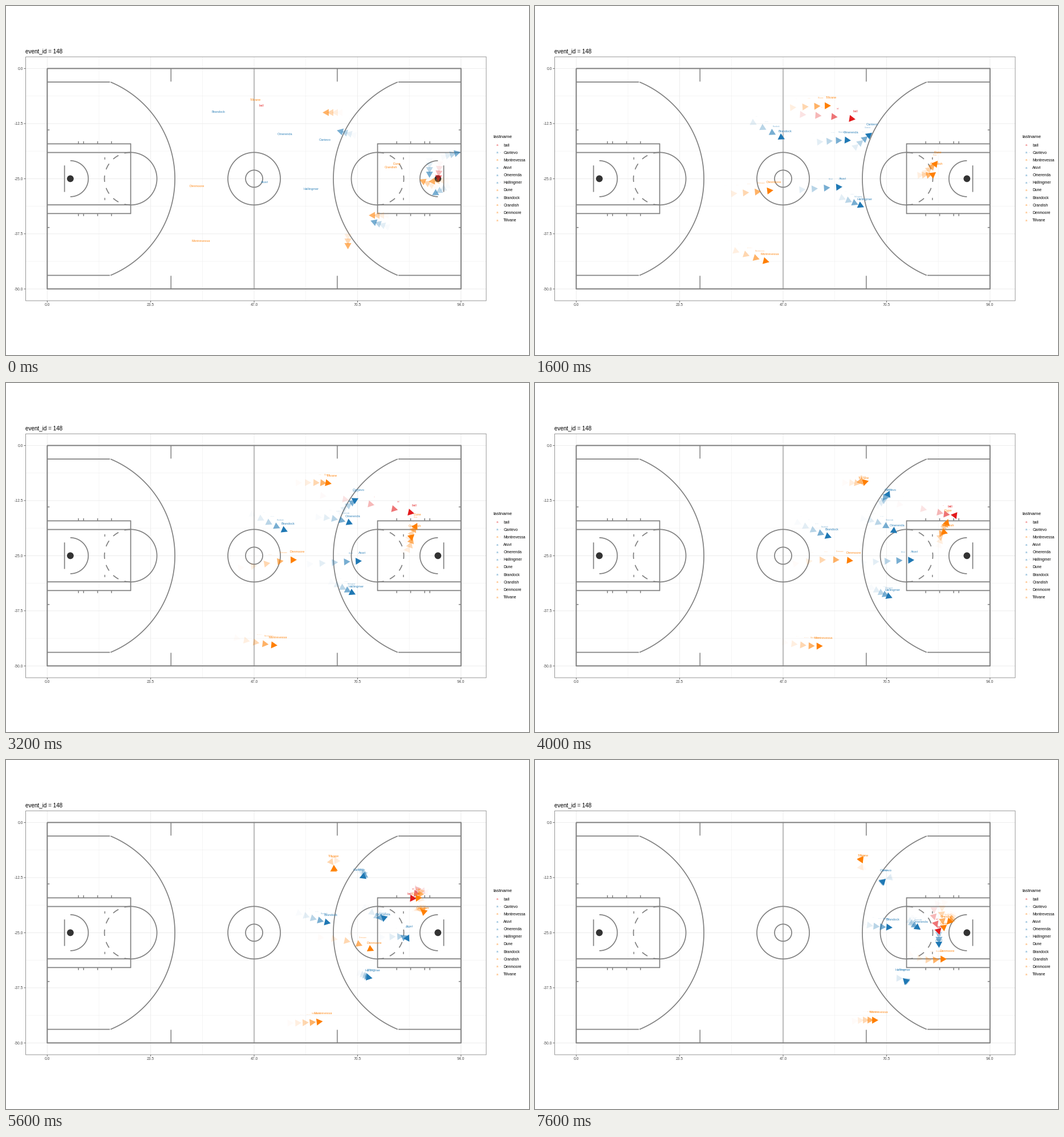
Recreate the animation shown at these times as a matplotlib script. Size 917 by 611 pixels, loop 8000 ms.

```python
import numpy as np
import matplotlib.pyplot as plt
from matplotlib.animation import FuncAnimation

W, H, DPI = 917, 611, 72          # at 72 dpi one point is one pixel
FRAMES, INTERVAL = 20, 400
BLUE, ORANGE, RED = "#1f78b4", "#ff7f00", "#e31a1c"
GREY = "#808080"
X0, Y0, FT = 71.8, 108.9, 7.718   # court origin and pixels per foot
X1, Y1 = X0 + 94 * FT, Y0 + 50 * FT
MID_X, MID_Y = (X0 + X1) / 2, (Y0 + Y1) / 2
LABEL_SIZE, LABEL_RISE = 5.6, 14.5
WAKE = 5                          # poses visible at once
KEYS = np.array([0, 4, 8, 12, 16, 19])

# Each runner passes through these points at the key frames.
RUNNERS = {
    "ball": (RED, (448, 188), (562, 198), (716, 228), (718, 233), (699, 269), (709, 306)),
    "Cantevo": (BLUE, (559, 248), (591, 221), (618, 201), (623, 204), (614, 208), (615, 207)),
    "Montrevessa": (ORANGE, (341, 425), (411, 448), (476, 459), (531, 459), (577, 455), (602, 455)),
    "Aruvi": (BLUE, (453, 322), (539, 316), (624, 311), (697, 308), (707, 306), (708, 329)),
    "Omerenda": (BLUE, (489, 238), (554, 235), (608, 247), (656, 278), (662, 287), (676, 297)),
    "Hallingmer": (BLUE, (534, 334), (577, 352), (613, 370), (637, 380), (645, 382), (644, 381)),
    "Dune": (ORANGE, (685, 290), (706, 270), (721, 244), (724, 237), (713, 266), (717, 300)),
    "Brandock": (BLUE, (372, 199), (438, 233), (494, 260), (545, 279), (593, 290), (627, 293)),
    "Crandish": (ORANGE, (674, 296), (703, 290), (716, 264), (730, 267), (728, 280), (721, 288)),
    "Denmoore": (ORANGE, (334, 329), (418, 322), (510, 309), (604, 318), (681, 348), (722, 348)),
    "Tillvane": (ORANGE, (437, 178), (519, 174), (571, 176), (574, 184), (574, 180), (574.5, 181)),
}

# Closing poses whose wake still fades at the start: x, y, heading in degrees
CLOSING = {
    ORANGE: [(554, 186, 180), (724, 303, 205), (740, 307, 175), (635, 366, 180), (599, 426, 90)],
    BLUE: [(579, 217, 195), (797, 255, -15), (742, 301, 90), (746, 331, 150), (638, 375, 200)],
    RED: [(757, 307, 95)],
}

plt.rcParams["font.family"] = "Liberation Sans"
fig = plt.figure(figsize=(W / DPI + 1e-5, H / DPI + 1e-5), dpi=DPI, facecolor="white")
ax = fig.add_axes([0, 0, 1, 1])
ax.set(xlim=(-0.5, W - 0.5), ylim=(H - 0.5, -0.5))   # whole numbers are pixel centres
ax.axis("off")


def text(x, y, s, size, color="black", ha="left", **kw):
    return ax.text(x, y + 0.35 * size, s, size=size, color=color, ha=ha, va="baseline", **kw)


def line(xs, ys, color=GREY, lw=1.7, z=2):
    ax.plot(xs, ys, color=color, lw=lw, zorder=z, solid_capstyle="butt", snap=False)


def arc(cx, cy, r, start, stop):
    a = np.radians(np.linspace(start, stop, 120))
    line(cx + r * np.cos(a), cy + r * np.sin(a))


def draw_panel():
    left, right, top, bottom = 34, 841.5, 88.5, 515.5
    for i in range(9):
        x, y = X0 + i * 11.75 * FT, Y0 + i * 6.25 * FT
        lw = 0.45 if i % 2 else 0.9
        line([x, x], [top, bottom], "#ebebeb", lw, 1)
        line([left, right], [y, y], "#ebebeb", lw, 1)
        if i % 2 == 0:
            line([x, x], [bottom, bottom + 3], "#555555", 0.9)
            line([left - 3, left], [y, y], "#555555", 0.9)
            text(x, 522, f"{i * 11.75:.1f}", 6.8, "#4d4d4d", "center")
            text(30, y, f"{-i * 6.25:.1f}" if i else "0.0", 6.8, "#4d4d4d", "right")
    line([left, right, right, left, left], [top, top, bottom, bottom, top], "#8c8c8c", 0.9)
    text(33.5, 78, "event_id = 148", 9.9)


def draw_half(side):
    """One half of the court; side is 1 for the left and -1 for the right."""
    base = X0 if side == 1 else X1
    hoop, key = 40.5, 146.3

    def px(x):
        return base + side * x

    def half_arc(x, r, start, stop):
        flip = 0 if side == 1 else 180
        arc(px(x), MID_Y, r, flip + side * start, flip + side * stop)

    corner = np.degrees(np.arcsin(169.2 / 183.3))
    half_arc(hoop, 183.3, -corner, corner)
    half_arc(hoop, 31.5, -90, 90)
    half_arc(key, 46, -90, 90)
    dash = 180 / 13
    for k in range(0, 13, 2):
        half_arc(key, 46, 90 + k * dash, 90 + (k + 1) * dash)
    for s in (-1, 1):
        def py(y):
            return MID_Y + s * y
        line([px(0), px(109.8)], [py(169.2)] * 2)
        line([px(0), px(key)], [py(61)] * 2)
        line([px(0), px(key)], [py(45.8)] * 2)
        line([px(217)] * 2, [py(193), py(170)], lw=1.5)
        line([px(0), px(4)], [py(85.4)] * 2, lw=1.5)
        line([px(101)] * 2, [py(33.5), py(37.5)], lw=1.5)
        for x in (54.7, 63.7, 88.3, 112.7):
            line([px(x)] * 2, [py(61), py(65.5)], lw=1.5)
    line([px(key)] * 2, [MID_Y - 61.8, MID_Y + 61.8])
    line([px(30.3)] * 2, [MID_Y - 23.2, MID_Y + 23.2])
    ax.add_patch(plt.Circle((px(hoop), MID_Y), 5.9, color="#333333", lw=0, zorder=3))


def draw_legend():
    text(854, 228, "lastname", 8.1)
    for i, (name, (color, *_)) in enumerate(RUNNERS.items()):
        y = 242.7 + 13.14 * i
        text(861, y, "a", 5.6, color, "center", alpha=0.6, weight="bold")
        if i in (1, 2, 5, 8, 9):
            text(866.5, y, "-", 4.5, color, "center", alpha=0.6)
        text(871.8, y, name, 6.7)


draw_panel()
line([MID_X] * 2, [Y0, Y1], "#bebebe", 2.2)
for side in (1, -1):
    draw_half(side)
arc(MID_X, MID_Y, 46, 0, 360)
arc(MID_X, MID_Y, 15, 0, 360)
line([X0, X1, X1, X0, X0], [Y0, Y0, Y1, Y1, Y0], lw=2)
draw_legend()

moving = []


def pose(points, n):
    """Position and heading on a smooth curve through the key points."""
    z = np.array([complex(*p) for p in points])
    slope = np.gradient(z, KEYS)
    k = min(np.searchsorted(KEYS, n, side="right") - 1, len(KEYS) - 2)
    span = KEYS[k + 1] - KEYS[k]
    u = (n - KEYS[k]) / span
    v = 1 - u
    place = (v * v * (1 + 2 * u) * z[k] + u * u * (3 - 2 * u) * z[k + 1]
             + span * u * v * (v * slope[k] - u * slope[k + 1]))
    speed = (6 * u * v * (z[k + 1] - z[k]) / span
             + v * (1 - 3 * u) * slope[k] + u * (3 * u - 2) * slope[k + 1])
    return place.real, place.imag, np.angle(speed)


def arrow(x, y, heading, color, alpha):
    """Triangle whose tip lies just behind the position."""
    shape = np.array([-0.6, -11.4 - 6.1j, -11.4 + 6.1j]) * np.exp(1j * heading)
    corners = np.column_stack([x + shape.real, y + shape.imag])
    moving.append(ax.add_patch(plt.Polygon(corners, color=color, alpha=alpha, lw=0, zorder=4)))


def fade(back):
    return (1 - back / WAKE) ** 2.3


def draw_closing(n):
    for back in range(WAKE - 1, n, -1):
        drift = 8 * (back - n - 1)
        for color, poses in CLOSING.items():
            for x, y, degrees in poses:
                a = np.radians(degrees)
                arrow(x - drift * np.cos(a), y - drift * np.sin(a), a, color, fade(back))


def update(n):
    while moving:
        moving.pop().remove()
    draw_closing(n)
    for back in range(min(n, WAKE - 1), -1, -1):
        for name, (color, *points) in RUNNERS.items():
            x, y, heading = pose(points, n - back)
            if n > back:
                arrow(x, y, heading, color, fade(back))
            moving.append(text(x, y - LABEL_RISE, name, LABEL_SIZE * 0.53 ** back, color,
                               "center", alpha=0.9 * fade(back), zorder=5))
    return moving


anim = FuncAnimation(fig, update, frames=FRAMES, interval=INTERVAL, init_func=lambda: [],
                     repeat=True, repeat_delay=0, blit=False)
plt.show()
```
